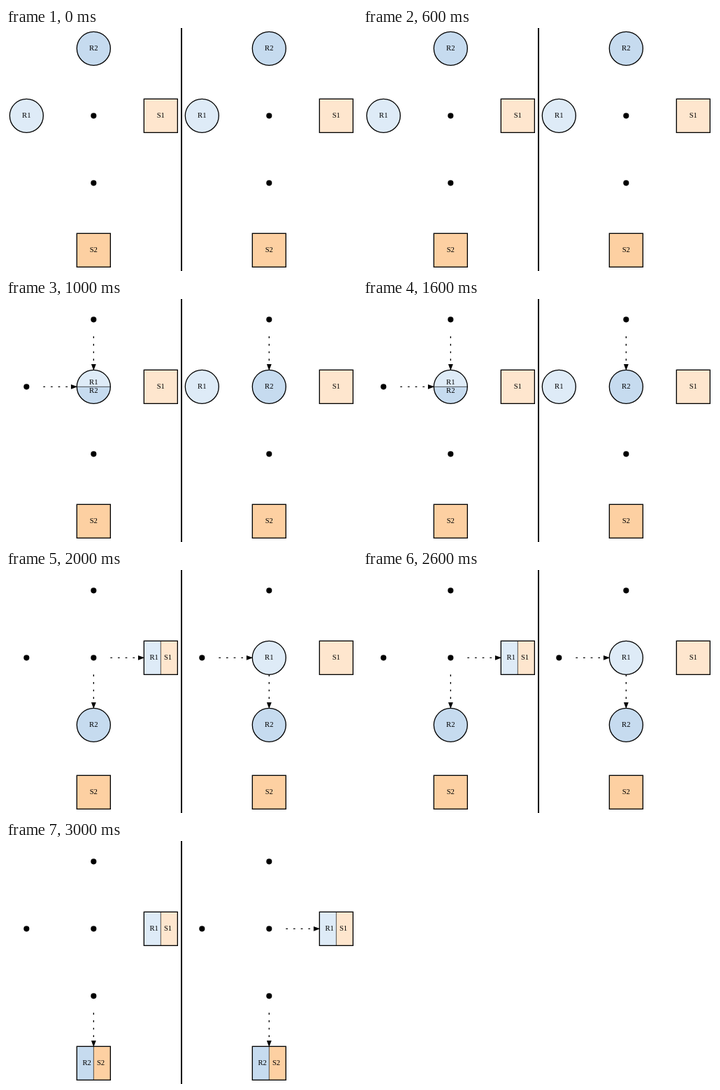
An HTML page for the animation above (4000 ms loop, 502x347 px).

```html
<!DOCTYPE html>
<html lang="en">
<head>
<meta charset="utf-8">
<title>Two robots, two plans</title>
<style>
html, body { margin: 0; width: 100%; height: 100%; overflow: hidden; background: #fff; }
svg { display: block; }
text { font: 10.67px "Liberation Serif", Times, serif; text-anchor: middle; white-space: pre; }
.outline { stroke: #000; stroke-width: 1.33; }
.split { stroke: #000; stroke-width: .67; }
.move { stroke: #000; stroke-width: 1.33; stroke-dasharray: 2.67 8; }
</style>
</head>
<body>
<svg id="stage" width="502" height="347" viewBox="0 0 502 347"></svg>
<script>
const STEP = 1000, HALF = 24;
const NODES = { left: [0, 1], top: [1, 0], mid: [1, 1], low: [1, 2], S1: [2, 1], S2: [1, 3] };
const FILL = { R1: '#deebf7', R2: '#c6dbef', S1: '#fee6ce', S2: '#fdd0a2' };
const PLANS = [
  { R1: ['left', 'mid', 'S1', 'S1'], R2: ['top', 'mid', 'low', 'S2'] },
  { R1: ['left', 'left', 'mid', 'S1'], R2: ['top', 'mid', 'low', 'S2'] }
];
const stage = document.getElementById('stage');

const place = name => NODES[name].map(k => 29.33 + 96 * k);
const text = (x, y, s) => `<text x="${x}" y="${y}">${s}</text>`;
const rect = (x, y, w, fill, cls = '') =>
  `<rect x="${x}" y="${y}" width="${w}" height="48" fill="${fill}" class="${cls}"/>`;
const circle = (x, y, fill, r = HALF) =>
  `<circle cx="${x}" cy="${y}" r="${r}" fill="${fill}" class="outline"/>`;

function goal(x, y, name, robot) {
  const l = x - HALF, t = y - HALF;
  if (!robot) return rect(l, t, 48, FILL[name], 'outline') + text(x, y + 3, name);
  return rect(l, t, HALF, FILL[robot]) + rect(x, t, HALF, FILL[name]) +
    `<path d="M${x} ${t}v48" class="split"/>` +
    rect(l, t, 48, 'none', 'outline') + text(x, y + 3, `${robot}\u00a0\u00a0\u00a0${name}`);
}

function shared(x, y) {
  const wedge = (fill, sweep) =>
    `<path d="M${x - HALF} ${y}a24 24 0 0 ${sweep} 48 0z" fill="${fill}"/>`;
  return wedge(FILL.R1, 1) + wedge(FILL.R2, 0) +
    `<path d="M${x - HALF} ${y}h48" class="split"/>` + circle(x, y, 'none') +
    text(x, y - 3.3, 'R1') + text(x, y + 9.1, 'R2');
}

function node(name, robots) {
  const [x, y] = place(name);
  if (name[0] === 'S') return goal(x, y, name, robots[0]);
  if (robots.length === 2) return shared(x, y);
  if (robots.length) return circle(x, y, FILL[robots[0]]) + text(x, y + 3, robots[0]);
  return circle(x, y, '#000', 3.4);
}

function arrow(from, to) {
  const [x, y] = place(from);
  const turn = place(to)[1] > y ? 90 : 0;
  return `<g transform="translate(${x} ${y}) rotate(${turn})">
    <path d="M24 0H63.5" class="move"/><path d="M63.6 -3.4L73 0L63.6 3.4z"/></g>`;
}

function panel(plan, step) {
  const robots = Object.keys(plan);
  const nodes = Object.keys(NODES).map(n => node(n, robots.filter(r => plan[r][step] === n)));
  const moves = robots
    .filter(r => step && plan[r][step] !== plan[r][step - 1])
    .map(r => arrow(plan[r][step - 1], plan[r][step]));
  return nodes.concat(moves).join('');
}

let shown = -1;
const start = performance.now();

function draw() {
  const step = Math.floor((performance.now() - start) / STEP) % 4;
  if (step !== shown) {
    shown = step;
    stage.innerHTML = PLANS.map((plan, i) =>
      `<g transform="translate(${251 * i})">${panel(plan, step)}</g>`).join('') +
      '<path d="M250 0h2v347h-2z"/>';
  }
  requestAnimationFrame(draw);
}
draw();
</script>
</body>
</html>
```
